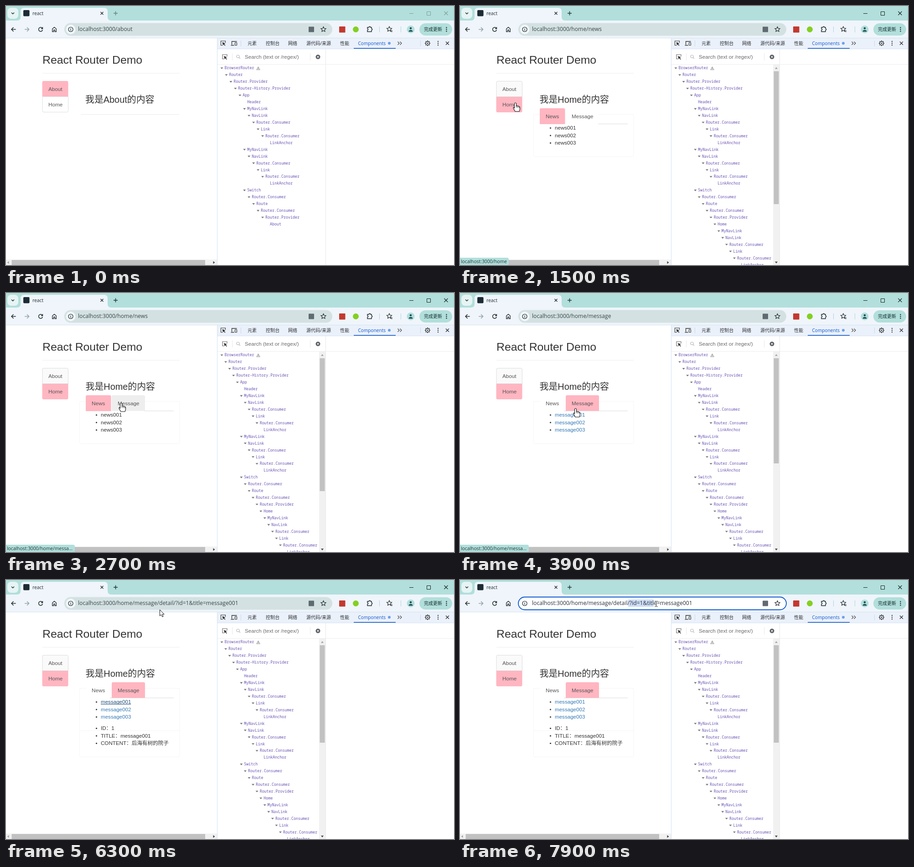
An HTML page with a canvas for the animation above (8000 ms loop, 983 by 570 pixels).

```html
<!DOCTYPE html>
<html lang="zh">
<head>
<meta charset="utf-8">
<title>React Router Demo</title>
<style>
html, body { margin: 0; width: 100%; height: 100%; overflow: hidden; background: #fff; }
canvas { display: block; }
</style>
</head>
<body>
<canvas id="stage" width="983" height="570"></canvas>
<script>
const ctx = document.getElementById('stage').getContext('2d');
const LOOP = 8000;
const UI = '"Open Sans", "Noto Sans CJK SC", "Noto Sans CJK", sans-serif';
const PAGE = '"Liberation Sans", "Noto Sans CJK SC", "Noto Sans CJK", sans-serif';
const MONO = '"Noto Sans Mono", monospace';
const TEAL = '#b2dfdb', BAR = '#eff5fb', INK = '#1f2a2e', PINK = '#ffb6c1', BLUE = '#0b57d0';

// Pointer tip: time, x, y
const TRACK = [
  [500, 374, 29], [600, 345, 72], [700, 298, 122], [800, 277, 150], [900, 204, 181],
  [1000, 163, 207], [1100, 149, 207], [1200, 128, 211], [1300, 121, 212], [2000, 121, 212],
  [2200, 133, 217], [2300, 160, 221], [2500, 240, 236], [2600, 252, 241], [3800, 252, 241],
  [3900, 253, 253], [4100, 252, 267], [5600, 252, 267], [5700, 258, 260], [5800, 285, 245],
  [5900, 310, 224], [6000, 340, 161], [6100, 344, 107], [6200, 338, 81], [6300, 337, 65],
  [6400, 338, 56], [6500, 338, 56], [6800, 374, 53], [7200, 374, 53], [7600, 373, 53],
  [7700, 370, 52], [7900, 430, 52]
];

const NAV = ['MyNavLink', 'NavLink', 'Router.Consumer', 'Link', 'Router.Consumer', 'LinkAnchor'];
const chain = (names, level) => names.map((name, i) => [name, level + i]);
const BASE = [
  ...chain(['BrowserRouter', 'Router', 'Router.Provider', 'Router-History.Provider', 'App', 'Header'], 0),
  ...chain(NAV, 5), ...chain(NAV, 5),
  ...chain(['Switch', 'Router.Consumer', 'Route', 'Router.Consumer', 'Router.Provider'], 5)
];
const ABOUT_TREE = [...BASE, ['About', 10]];
const HOME_TREE = [...BASE, ['Home', 10], ...chain(NAV, 11)];

function rect(x, y, w, h, color, r = 0) {
  ctx.fillStyle = color;
  ctx.beginPath();
  ctx.roundRect(x, y, w, h, r);
  ctx.fill();
}
function frame(x, y, w, h, color, r = 0, width = 1) {
  ctx.strokeStyle = color;
  ctx.lineWidth = width;
  ctx.beginPath();
  ctx.roundRect(x, y, w, h, r);
  ctx.stroke();
}
function dot(x, y, r, color) {
  ctx.fillStyle = color;
  ctx.beginPath();
  ctx.arc(x, y, r, 0, Math.PI * 2);
  ctx.fill();
}
function ring(x, y, r, color, width = 1.3) {
  ctx.strokeStyle = color;
  ctx.lineWidth = width;
  ctx.beginPath();
  ctx.arc(x, y, r, 0, Math.PI * 2);
  ctx.stroke();
}
// Path around a local origin, optionally filled and stroked
function shape(d, x, y, stroke, width = 1.4, fill) {
  const p = new Path2D(d);
  ctx.save();
  ctx.translate(x, y);
  if (fill) { ctx.fillStyle = fill; ctx.fill(p); }
  if (stroke) { ctx.strokeStyle = stroke; ctx.lineWidth = width; ctx.stroke(p); }
  ctx.restore();
}
function text(str, x, midY, size, color, family = PAGE, weight = 400) {
  ctx.font = `${weight} ${size}px ${family}`;
  ctx.fillStyle = color;
  ctx.fillText(str, x, Math.round(midY + size * 0.36));
}
function dots(x, y, color) {
  for (const d of [-4, 0, 4]) dot(x, y + d, 1.2, color);
}
function cross(x, y, r, color, width) {
  shape(`M${-r} ${-r}L${r} ${r}M${r} ${-r}L${-r} ${r}`, x, y, color, width);
}
function star(x, y, r, color) {
  let d = '';
  for (let i = 0; i < 10; i++) {
    const a = Math.PI * (i / 5 - 0.5), q = i % 2 ? r * 0.48 : r;
    d += `${i ? 'L' : 'M'}${(q * Math.cos(a)).toFixed(2)} ${(q * Math.sin(a)).toFixed(2)}`;
  }
  shape(d + 'Z', x, y, color, 1.2);
}
function gear(x, y, r, color, width) {
  ring(x, y, r, color, width);
  for (let i = 0; i < 8; i++) {
    const a = i * Math.PI / 4, c = Math.cos(a), s = Math.sin(a);
    shape(`M${c * r} ${s * r}L${c * (r + 2)} ${s * (r + 2)}`, x, y, color, 2);
  }
}
function triangle(x, y, dx, dy, color) {
  shape(`M${dx * 2.5} ${dy * 2.5}L${dy * 3 - dx * 1.5} ${dx * 3 - dy * 1.5}L${-dy * 3 - dx * 1.5} ${-dx * 3 - dy * 1.5}Z`,
    x, y, null, 0, color);
}

function drawTabs(active) {
  rect(0, 0, 983, 32, TEAL);
  rect(3, 4, 24, 24, '#e6f4f4', 8);
  shape('M-3-1.5L0 1.5L3-1.5', 15, 16, INK);
  shape('M24 32Q32 32 32 24V12Q32 4 40 4H215Q223 4 223 12V24Q223 32 231 32Z', 0, 0, null, 0, BAR);
  rect(38, 9, 13.5, 13.5, '#1d2b35', 2);
  text('react', 58, 16, 10.3, INK, UI);
  cross(210.5, 16, 3, INK, 1.3);
  const color = active ? '#14201f' : '#7f9d9b';
  shape('M-4.5 0H4.5M0-4.5V4.5', 240.5, 16, active ? '#1c3331' : '#5f807e', 1.4);
  shape('M-4.5 0H4.5', 889.5, 16.5, color, 1);
  frame(923.5, 12.5, 8, 8, color);
  cross(965.5, 16, 4, color, 1.1);
}

function drawToolbar(t, url) {
  rect(0, 32, 983, 39, BAR);
  rect(0, 70, 983, 1, '#d5e4ee');
  shape('M5 0H-4M0-4.5L-4.5 0L0 4.5', 16.5, 51.5, INK, 1.5);
  shape('M-5 0H4M0-4.5L4.5 0L0 4.5', 46, 51.5, '#94a3a8', 1.5);
  shape('M3.6-2.6A4.4 4.4 0 1 0 4.3 1M4.4-5V-1.6H1', 76, 51.5, INK, 1.5);
  shape('M-4.3 5V-1.2L0-4.8L4.3-1.2V5H1.3V1.2H-1.3V5Z', 106, 51.5, INK, 1.3);

  const focus = t >= 7700;
  if (focus) {
    rect(128, 37.5, 588, 28, '#fff', 14);
    frame(128, 37.5, 588, 28, BLUE, 14, 1.8);
  } else {
    rect(128, 37.5, 588, 28, t >= 6400 ? '#c9d7d8' : '#d4e1e2', 14);
    dot(142, 51.5, 10.5, '#f1f7fa');
  }
  ring(142, 51.5, 5, INK, 1.2);
  rect(141.4, 50.7, 1.3, 3.5, INK);
  rect(141.4, 48.4, 1.3, 1.3, INK);
  if (t >= 7800) rect(369, 43, t >= 7900 ? 56 : 29, 16, '#cfdef6');
  text(url, 158, 51, 12.15, focus ? '#27313a' : '#37464b', UI);
  rect(664, 45.5, 12, 12, '#5f6b70', 1);
  star(696.5, 51.5, 5.8, INK);
  rect(731, 45, 13.5, 13.5, '#c3392f', 1);
  dot(767.5, 51.5, 6.5, '#84cf22');
  shape('M-5-3.5H-1.6A1.7 1.7 0 0 1 1.8-3.5H4V-.6A1.7 1.7 0 0 1 4 2.8V6H-5V2.8A1.7 1.7 0 0 0-5-.6Z', 798, 50.5, INK, 1.4);
  rect(819, 45, 1, 13, '#b2d3d5');
  star(841, 51, 5.8, INK);
  shape('M1 3H6M2 5.5H6', 842, 51, INK, 1.2);
  rect(866, 45, 1, 13, '#b2d3d5');
  dot(888, 51.5, 8.5, TEAL);
  dot(888, 49, 2.3, '#1e4f55');
  shape('M-4.5 5Q-4 1.3 0 1.3Q4 1.3 4.5 5Z', 888, 51.5, null, 0, '#1e4f55');
  rect(907, 38, 72, 27, TEAL, 13.5);
  text('完成更新', 917, 51.5, 10, '#0f2a2a', UI, 500);
  dots(966.5, 51.5, INK);
}

function drawMenu(t, home, pointer) {
  rect(79.5, 165, 57, 34.5, home ? '#fafafa' : PINK, [3, 3, 0, 0]);
  const hover = pointer && pointer.kind === 'hand' && pointer.y > 199 && !home;
  rect(79.5, 199.5, 57, 34.5, home ? PINK : hover ? '#f5f5f5' : '#fff', [0, 0, 3, 3]);
  if (home) frame(80, 165.5, 56.5, 34, '#ddd', [3, 3, 0, 0]);
  else frame(80, 199.5, 56.5, 34, '#ddd', [0, 0, 3, 3]);
  text('About', 93, 182.5, 11.7, '#555');
  text('Home', 93, 216.5, 11.7, '#555');
}

function list(items, y, color, firstColor = color) {
  items.forEach((item, i) => {
    dot(198.5, y + i * 16.5 + 0.5, 1.6, '#333');
    text(item, 208, y + i * 16.5, 11.6, i ? color : firstColor);
  });
}

function drawHome(t) {
  const message = t >= 3200, detail = t >= 4600;
  rect(161, 238, 220, 1, '#f6f6f6');
  frame(161.5, 238.5, 219.5, detail ? 151 : 93, '#f6f6f6', 3);
  if (detail) rect(161, 331, 220, 1, '#f6f6f6');
  text('我是Home的内容', 174.5, 206, 19.9, '#333');
  rect(176, 226, 128, 33, '#fff');
  const start = message ? 228 : 303;
  rect(start, 259, 368 - start, 1, '#ddd');
  if (message) rect(232, 225, 73, 34.5, PINK, [3, 3, 0, 0]);
  else {
    rect(175, 225, 55.5, 35, PINK, [3, 3, 0, 0]);
    if (t >= 2500) rect(232, 225, 73, 34.5, '#eee', [3, 3, 0, 0]);
  }
  text('News', 188, 242.5, 11.7, '#555');
  text('Message', 245, 242.5, 11.7, '#555');
  const names = ['001', '002', '003'];
  if (!message) return list(names.map(n => 'news' + n), 268, '#333');
  const marked = t >= 4000 && t < 7700;
  list(names.map(n => 'message' + n), 268, '#337ab7', marked ? '#23527c' : '#337ab7');
  if (marked) rect(208, 273, 66, 1, '#23527c');
  if (detail) list(['ID：1', 'TITLE：message001', 'CONTENT：后海有树的院子'], 326, '#333');
}

function drawPage(t, home, pointer) {
  rect(0, 71, 463, 499, '#fff');
  text('React Router Demo', 80, 118, 24.8, '#333');
  rect(80, 147.5, 301, 1, '#eee');
  drawMenu(t, home, pointer);
  if (home) drawHome(t);
  else {
    text('我是About的内容', 174, 206, 19.9, '#333');
    rect(164, 238, 216, 1, '#eaeaea');
  }
  rect(0, 558, 463, 12, '#f1f1f1');
  rect(12.5, 559, 424.5, 11, '#c1c1c1');
  triangle(5, 564.5, -1, 0, '#a3a3a3');
  triangle(456, 564.5, 1, 0, '#444');
}

function drawStatus(t) {
  if (t < 1400 || t >= 5900) return;
  const [label, width] = t < 2500 ? ['', 107] : t < 4100 ? ['/messa...', 151]
    : ['/.../detail...', t < 4200 ? 151 : 256];
  rect(0, 554, width, 16, TEAL, [0, 4, 0, 0]);
  text('localhost:3000/home' + label, 2, 562.5, 10.3, '#1f3434', UI);
}

function drawTree(t, home) {
  const rows = home ? HOME_TREE : ABOUT_TREE, indent = home ? 8.57 : 9.95;
  rows.forEach(([name, level], i) => {
    const x = 479.5 + level * indent, y = 136.5 + i * 14.935;
    const leaf = !rows[i + 1] || rows[i + 1][1] <= level;
    if (!leaf) shape('M-3-1.8H3L0 1.8Z', x - 6, y + 0.5, null, 0, '#777');
    text(name, x, y, 8.33, '#6a51b2', MONO);
  });
  shape('M0-3.5L4 3.5H-4Z', 553.5, 137, '#aaa', 1, '#ddd');
  rect(553, 135.5, 1, 3, '#888');
  if (!home) return;
  rect(687, 129, 14, 441, '#f1f1f1');
  rect(688.5, 143.5, 11, (t < 3200 ? 436 : t < 4600 ? 375 : 358) - 143.5, '#c1c1c1');
  triangle(694, 137, 0, -1, '#a3a3a3');
  triangle(694, 564, 0, 1, '#444');
}

function drawDevtools(t, home) {
  rect(463, 71, 520, 499, '#fff');
  rect(463, 71, 520, 23, '#ebf1fa');
  rect(463, 94, 520, 1, '#d3e1f5');
  shape('M-1 4.5H-5V-5H5V-1', 476.5, 82, '#333', 1.1);
  shape('M-2-2L5 .8L2.2 2L5 5L3.8 6L1 3L-.2 5.2Z', 476.5, 81.5, null, 0, '#333');
  shape('M-5 3V-4H6M-7 4.5H0', 500.5, 82, '#333', 1.3);
  frame(502.5, 80.5, 4, 6, '#333', 0.5, 1.2);
  rect(515, 76, 1, 13, '#c9d8ee');
  const tabs = [['元素', 530], ['控制台', 570], ['网络', 619], ['源代码/来源', 659], ['性能', 733]];
  for (const [name, x] of tabs) text(name, x, 82, 10.1, '#2b2f33', UI);
  text('Components', 772.5, 82, 10.1, BLUE, UI);
  dot(841, 82, 3, '#6f9fe8');
  rect(763, 92.5, 92, 1.5, BLUE);
  shape('M-4-3.5L-.5 0L-4 3.5M1-3.5L4.5 0L1 3.5', 863.5, 82, '#444', 1.2);
  rect(909, 76, 1, 13, '#c9d8ee');
  gear(925, 82, 4, '#3c4043', 1.3);
  dot(925, 82, 1.6, '#3c4043');
  dots(948, 82, '#3c4043');
  cross(968.5, 82, 3.5, '#2b2f33', 1.3);

  shape('M-1 4.5H-5V-5H5V-1', 480, 112, '#666', 1.1);
  shape('M-2-2L5 .8L2.2 2L5 5L3.8 6L1 3L-.2 5.2Z', 480, 112, null, 0, '#333');
  rect(496, 104, 1, 16, '#e8e8e8');
  ring(509, 111, 3, '#bbb', 1.2);
  shape('M2 2L5 5', 509, 111, '#bbb', 1.3);
  text('Search (text or /regex/)', 524, 112, 11.6, '#6b6b6b');
  rect(667, 104, 1, 16, '#e8e8e8');
  gear(684.5, 112, 3.2, '#5f6368', 2.8);
  rect(463, 128, 520, 1, '#eee');
  drawTree(t, home);
  rect(701, 95, 1, 475, '#e8e8e8');
  rect(463, 71, 1, 499, '#d3e1f5');
}

function pointerAt(t) {
  if (t < TRACK[0][0]) return null;
  let i = TRACK.findIndex(k => k[0] > t);
  if (i < 0) i = TRACK.length;
  const [t0, x0, y0] = TRACK[i - 1], [t1, x1, y1] = TRACK[i] || [t + 1, x0, y0];
  const p = (t - t0) / (t1 - t0);
  const x = x0 + (x1 - x0) * p, y = y0 + (y1 - y0) * p;
  const inside = (l, top, r, b) => x >= l && x <= r && y >= top && y <= b;
  const link = inside(80, 165, 137, 234) || (t >= 1400 && inside(175, 225, 305, 275));
  return { x, y, kind: t >= 6400 ? 'beam' : link ? 'hand' : 'arrow' };
}

function drawPointer({ x, y, kind }) {
  x = Math.round(x) + 0.5;
  y = Math.round(y) + 0.5;
  if (kind === 'beam') {
    const d = 'M-3-6H-1L0-5L1-6H3M0-5V5M-3 6H-1L0 5L1 6H3';
    shape(d, x, y, '#fff', 2.4);
    shape(d, x, y, '#111', 1);
  } else if (kind === 'hand') {
    shape('M-2 2Q0-1 2 2V7.5Q4 6.2 5.2 8Q7.2 7 8.2 9Q10 8.6 10 11V14Q9.8 17 8.5 19.5H-.5Q-2 17-4 13.5Q-5.3 11-3.8 10.4Q-3 10.3-2 12Z',
      x, y, '#111', 1.1, '#fff');
    shape('M2 7V11M5 8V11.5M8 9.5V12', x, y, '#111', 0.9);
  } else {
    shape('M0 0V13.5L3.2 10.7L5.4 15.6L7.6 14.6L5.5 9.8H9.6Z', x, y, '#111', 1, '#fff');
  }
}

function urlAt(t) {
  const path = t < 1400 ? 'about' : t < 3200 ? 'home/news' : t < 4600 ? 'home/message'
    : 'home/message/detail/?id=1&title=message001';
  return 'localhost:3000/' + path;
}

function draw() {
  const t = Math.floor(performance.now() % LOOP / 100) * 100;
  const home = t >= 1400, pointer = pointerAt(t);
  drawTabs(home);
  drawToolbar(t, urlAt(t));
  drawPage(t, home, pointer);
  drawStatus(t);
  drawDevtools(t, home);
  if (pointer) drawPointer(pointer);
  requestAnimationFrame(draw);
}
requestAnimationFrame(draw);
</script>
</body>
</html>
```
